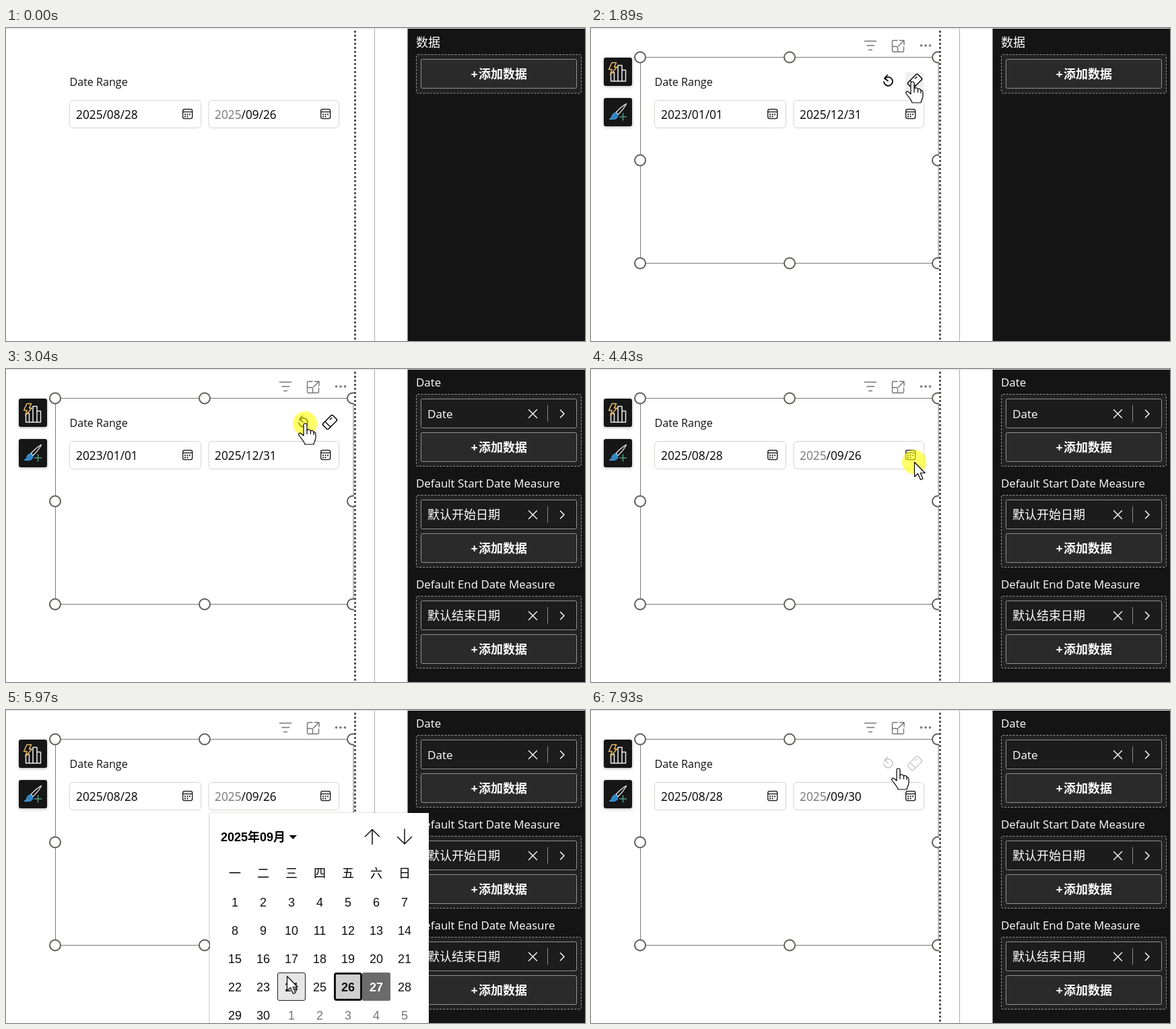
These frames come from a looping animation (860x465 px, 7990 ms). An HTML page:

```html
<!DOCTYPE html>
<html lang="zh-CN">
<head>
<meta charset="utf-8">
<title>Date Range</title>
<style>
html, body { margin: 0; width: 100%; height: 100%; overflow: hidden; background: #fff; }
svg { display: block; }
text { font-family: "Open Sans", "Noto Sans CJK SC", "Noto Sans CJK", sans-serif; }
.cal text { font-family: "Liberation Sans", "Noto Sans CJK SC", "Noto Sans CJK", sans-serif; font-size: 18px; }
.line { fill: none; stroke-linecap: round; stroke-linejoin: round; }
</style>
</head>
<body>
<svg id="stage" width="860" height="465" viewBox="0 0 860 465"></svg>
<script>
const LOOP = 7990;
const BEGIN = 120, SELECT = 1890, FIELDS = 1960, OPEN = 4710, PICK = 7070, CLOSE = 7200;

// cursor: time, x, y
const PATH = [
  [BEGIN, 716, 411], [890, 470, 92], [1090, 477, 80], [2030, 477, 80], [2370, 444, 81],
  [3720, 444, 81], [4240, 480, 138], [5040, 480, 138], [5290, 592, 440], [5690, 592, 440],
  [5970, 417, 395], [6530, 387, 439], [6800, 387, 439], [6870, 387, 441], [7470, 387, 441], [7930, 456, 87]
];
// tool icons: time, opacity
const FADE = [[890, 0], [1090, 1], [3850, 1], [4100, 0], [7860, 0], [7930, .2]];
const CLICKS = [[1360, 1620], [3040, 3240], [4430, OPEN], [6870, PICK]];
const CELL = 42, COL0 = 340, ROW0 = 285;

const rect = (x, y, w, h, attrs) => `<rect x="${x}" y="${y}" width="${w}" height="${h}" ${attrs}/>`;
const path = (d, color, width = 1.5, attrs = '') =>
  `<path class="line" d="${d}" stroke="${color}" stroke-width="${width}" ${attrs}/>`;
const text = (x, y, s, size, attrs = '') => `<text x="${x}" y="${y}" font-size="${size}" ${attrs}>${s}</text>`;

// ---- side panel ----
const well = (y, h) => rect(609.5, y, 245, h, 'rx="2" fill="#222" stroke="#999" stroke-dasharray="3 2"');
const addButton = y =>
  rect(616.5, y, 231, 43, 'rx="2" fill="#2a2a2a" stroke="#919191"') +
  text(690.5, y + 28.5, '+', 18, 'fill="#fff" font-weight="700"') +
  text(702, y + 28.5, '添加数据', 18, 'fill="#fff" font-weight="700"');

function fieldGroup(label, value, y) {
  return text(609, y + 26, label, 16.9, 'fill="#fff"') + well(y + 37.5, 107) +
    rect(616.5, y + 44.5, 231, 43, 'rx="2" fill="#1c1c1c" stroke="#919191"') +
    text(626, y + 73, value, value === 'Date' ? 17.1 : 18, 'fill="#fff"') +
    path(`M776.5 ${y + 60.5}l12 12m0 -12l-12 12`, '#fff', 1.4) +
    path(`M804.5 ${y + 54}v24`, '#8a8a8a', 1) +
    path(`M823.5 ${y + 61}l5.5 5.5l-5.5 5.5`, '#fff', 1.5) + addButton(y + 94.5);
}

// ---- date slicer ----
function dateBox(x, w, id) {
  const cx = x + w - 27.5;
  let dots = '';
  for (const [dx, dy] of [[4, 8], [7.5, 8], [11, 8], [4, 11.3], [7.5, 11.3]])
    dots += rect(cx + dx - .9, 120 + dy - .6, 1.9, 1.9, 'fill="#111"');
  return rect(x, 107.5, w, 41, 'rx="5" fill="#fff" stroke="#d6d4d0"') +
    `<text id="${id}" y="135" x="${Math.round(x + 9)}" font-size="17.3"></text>` +
    rect(cx + .7, 120.7, 14, 14, 'rx="2.6" fill="none" stroke="#111" stroke-width="1.3"') +
    path(`M${cx + 1} 124.7h13.4`, '#111', 1.2) + dots;
}

const header =
  path('M406.5 19.5h17M410 26h10.5M412.8 32.5h4.6', '#757575', 1.6) +
  path('M455 18.5h-5.5q-2 0 -2 2v13q0 2 2 2h13q2 0 2 -2v-5.500M458.500 18.500h6.500v6.500M464.500 19l-8 8M447.500 27.500h6q2 0 2 2v6', '#757575', 1.4) +
  [490.5, 497, 503.500].map(x => `<circle cx="${x}" cy="26" r="1.8" fill="#757575"/>`).join('');

function handles() {
  let s = '';
  for (const y of [43.5, 196.5, 349.5])
    for (const x of [73, 295, 515])
      if (x !== 295 || y !== 196.5)
        s += `<circle cx="${x}" cy="${y}" r="8" fill="#fff" stroke="#5f5d59" stroke-width="2"/>`;
  return `<g clip-path="url(#page)">${s}</g>`;
}

const sideButton = y => rect(19, y, 42, 42, 'rx="3" fill="#161616" filter="url(#soft)"');
const sideIcons = sideButton(44) +
  path('M34.500 79V66h-5v13h22V62.500h-5.500V79M46 79V55.500h-6V79', '#eee', 1.5) +
  path('M31 51.500h6.500l-3 6.500h4l-9.500 11l2 -7.500h-4.500z', '#e8bd68', 1.5, 'style="fill:#161616"') +
  sideButton(104) +
  path('M52.500 112.500q-8 4.500 -15.500 13l3 3q8 -7 12.500 -16z', '#eee', 1.3) +
  path('M36.500 125.500l3.500 3.500q0 6 -6 6.500h-7q4 -2 4 -5q1 -4 5.500 -5z', '#4aa3df', 1, 'style="fill:#2f86c6"') +
  path('M47.500 127v10M42.500 132h10', '#4f9a80', 1.5);

const tools =
  path('M436.200 75.500a6.500 6.500 0 1 1 -1.200 4.500M440 70l-4 4.800l5 3.600', '#000', 1.8) +
  `<g transform="rotate(-45 481 79)">` +
  rect(470.7, 73.3, 20.6, 11.4, 'rx="2.2" fill="#fff" stroke="#000" stroke-width="1.5"') +
  path('M476.500 73.500v11M484 76.500h3.500', '#000', 1.4) + '</g>';

// ---- calendar ----
const center = i => [COL0 + i % 7 * CELL, ROW0 + Math.floor(i / 7) * CELL];

function calendar() {
  let s = rect(303, 153, 325, 320, 'fill="#fff" filter="url(#soft)"') + rect(303, 153, 325, 312, 'fill="#fff"') +
    text(319, 195, '2025年09月', 18, 'font-weight="700"') +
    '<path d="M420.500 186h11.500l-5.750 6z"/>' +
    path('M544 199.500v-22M533.500 188l10.500 -10.500l10.500 10.500', '#111', 1.5) +
    path('M592 177v22M581.500 188.500l10.500 10.500l10.500 -10.500', '#111', 1.5);
  [...'一二三四五六日'].forEach((d, i) => s += text(COL0 + i * CELL, 249, d, 18, 'text-anchor="middle"'));
  s += '<g id="marks"></g>';
  for (let i = 0; i < 35; i++) {
    const [x, y] = center(i);
    s += text(x, y + 6.5, i < 30 ? i + 1 : i - 29, 18,
      `id="day${i + 1}" text-anchor="middle" fill="${i === 26 ? '#fff' : i < 30 ? '#111' : '#767676'}" font-weight="${i === 26 ? 700 : 400}"`);
  }
  return s;
}

const cell = (day, inset, attrs) => {
  const [x, y] = center(day - 1), size = CELL - 2 * inset;
  return rect(x - 21 + inset, y - 21 + inset, size, size, `rx="2.5" ${attrs}`);
};

function marks(hover, picked) {
  let s = cell(27, 0, 'fill="#6b6b6b"');
  if (hover && hover !== 27) s += cell(hover, .5, 'fill="#e6e6e6" stroke="#222"');
  return s + cell(picked, 1.5, 'fill="#cfcfcf" stroke="#111" stroke-width="3"');
}

const HAND = 'M-2 2C-2 -1 3 -1 3 2V10C5 8 8 9 8.500 11C10.500 9.500 12.500 10.500 13 13C14.500 12 16 13.500 16 16' +
  'V21C16 25 13.500 27 13 31H0C-1 27 -5 23 -8.500 18C-10.500 15 -8 13 -5.500 15L-2 18Z';

document.getElementById('stage').innerHTML = `
<defs>
  <clipPath id="page"><rect width="517" height="465"/></clipPath>
  <filter id="soft" x="-30%" y="-30%" width="160%" height="160%"><feDropShadow dx="0" dy="1" stdDeviation="2" flood-opacity=".3"/></filter>
</defs>
${rect(0, 0, 860, 465, 'fill="#fff"')}
${rect(0, 0, 860, 1, 'fill="#dcdcdc"')}
${rect(547, 1, 1, 464, 'fill="#ababab"')}
<g id="hover">${rect(73.5, 43.5, 442.5, 306, 'fill="none" stroke="#7a7a78"')}${header}</g>
<g id="selected">${handles()}${sideIcons}</g>
<path d="M518.500 4V465" stroke="#555" stroke-width="3" stroke-dasharray="3 3"/>
${text(94.5, 86, 'Date Range', 16.1, 'fill="#111"')}
${dateBox(94.5, 195, 'from')}${dateBox(301, 193.5, 'to')}
${rect(467, 66, 27, 28, 'id="press" rx="3" fill="#efefef"')}
<g id="tools">${tools}</g>
${rect(596.5, 1, 263.5, 464, 'fill="#141414"')}
<g id="empty">${text(609, 28, '数据', 18, 'fill="#fff"')}${well(39.5, 57.5)}${addButton(46.5)}</g>
<g id="fields">${fieldGroup('Date', 'Date', 0)}${fieldGroup('Default Start Date Measure', '默认开始日期', 150)}${fieldGroup('Default End Date Measure', '默认结束日期', 300)}</g>
<g id="calendar" class="cal">${calendar()}</g>
<circle id="click" r="18" fill="#ff0" opacity=".6"/>
<g id="cursor" stroke="#000" stroke-width="1.200" stroke-linejoin="round" fill="#fff">
  <path id="arrow" d="M.5 .5V22L5.500 17.500L9.500 26.500L13 25L9.200 16.500H16.200Z"/>
  <g id="hand"><path d="${HAND}"/><path fill="none" d="M3 10v6M8.500 11v5M13 13v4"/></g>
</g>`;

const el = {};
document.querySelectorAll('[id]').forEach(e => el[e.id] = e);
const show = (e, on) => { e.style.display = on ? '' : 'none'; };
const write = (e, s) => { if (e.innerHTML !== s) e.innerHTML = s; };
const ease = k => k * k * (3 - 2 * k);

function at(table, t) {
  const i = table.findIndex(row => row[0] > t);
  if (i === 0) return table[0].slice(1);
  if (i < 0) return table[table.length - 1].slice(1);
  const a = table[i - 1], b = table[i], k = ease((t - a[0]) / (b[0] - a[0]));
  return a.slice(1).map((v, j) => v + (b[j + 1] - v) * k);
}

function hoverDay(x, y) {
  const c = Math.floor((x - COL0 + 21) / CELL), r = Math.floor((y - ROW0 + 21) / CELL);
  return c >= 0 && c < 7 && r >= 0 && r < 5 ? r * 7 + c + 1 : 0;
}

function render(t) {
  const [x, y] = at(PATH, t);
  const open = t >= OPEN && t < CLOSE, full = t >= 1620 && t < 3240;
  const selected = t >= SELECT;

  show(el.hover, selected || (t >= BEGIN && x < 517));
  show(el.selected, selected);
  show(el.empty, t < FIELDS);
  show(el.fields, t >= FIELDS);
  show(el.press, t >= 1090 && t < FIELDS);
  el.tools.setAttribute('opacity', at(FADE, t)[0]);

  const grey = '<tspan fill="#767676">2025</tspan>';
  write(el.from, full ? '2023/01/01' : '2025/08/28');
  write(el.to, full ? '2025/12/31' : grey + (t >= CLOSE ? '/09/30' : '/09/26'));

  show(el.calendar, open);
  if (open) {
    const picked = t >= PICK ? 30 : 26;
    el.marks.innerHTML = marks(hoverDay(x, y), picked);
    for (const d of [26, 30]) el['day' + d].setAttribute('font-weight', d === picked ? 700 : 400);
  }

  show(el.click, CLICKS.some(([a, b]) => t >= a && t < b));
  el.click.setAttribute('cx', x);
  el.click.setAttribute('cy', y);

  const hand = y < 96 && x > 430 && x < 495;
  show(el.cursor, t >= BEGIN);
  show(el.hand, hand);
  show(el.arrow, !hand);
  el.cursor.setAttribute('transform', `translate(${x.toFixed(2)} ${y.toFixed(2)})`);
}

const start = performance.now();
function tick() {
  render((performance.now() - start) % LOOP);
  requestAnimationFrame(tick);
}
tick();
</script>
</body>
</html>
```
